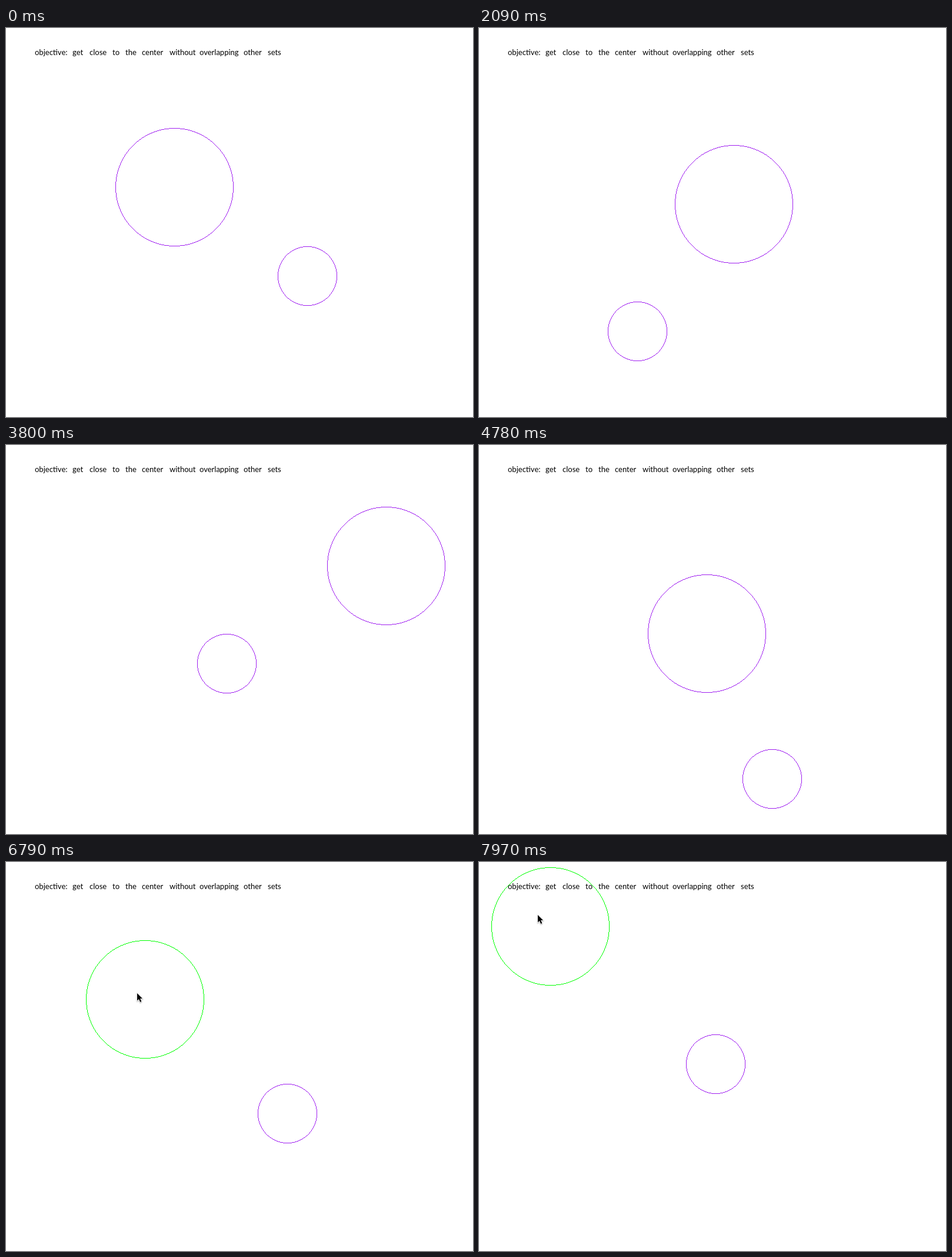
An HTML page with a canvas that plays this animation: 794 px wide and 661 px high, repeating every 8000 ms.

```html
<!DOCTYPE html>
<html lang="en">
<head>
<meta charset="utf-8">
<title>Sets</title>
<style>
html, body { margin: 0; width: 100%; height: 100%; overflow: hidden; background: #fff; }
canvas { display: block; }
</style>
</head>
<body>
<canvas id="stage" width="794" height="661"></canvas>
<script>
const LOOP = 8000, GRAB = 5940, DROP = 7970;
const ctx = document.getElementById("stage").getContext("2d");
const arrow = new Path2D("M0 0V12.6L3 9.9 5.1 15 7.3 14 5.1 9.1H9Z");
const words = { "objective:": 49, get: 113, close: 142, to: 181, the: 203, center: 231,
  without: 278, overlapping: 329, other: 404, sets: 445 };

// Each round puts both sets somewhere new, then they drift together to rest.
const rounds = [
  { start: 0, end: 1, big: [286, 270], small: [512, 421], drift: [0, 0] },
  { start: 500, end: 1280, big: [512, 150], small: [270, 271], drift: [-228, -420] },
  { start: 1600, end: 2400, big: [441, 199], small: [277, 415], drift: [21, -258] },
  { start: 2420, end: 3180, big: [757, 125], small: [486, 291], drift: [-183, 1] },
  { start: 3230, end: 3800, big: [646, 205], small: [375, 371], drift: [-111, 80] },
  { start: 4220, end: 4780, big: [387, 320], small: [498, 567], drift: [-50, -125] }
];
// Turning points of the drag: time, x, y
const dragged = [[GRAB, 392, 374], [6290, 296, 280], [6730, 247, 245],
  [7260, 148, 142], [7800, 104, 98], [DROP, 121, 109]];
const pushed = [[GRAB, 498, 567], [6040, 515, 578], [6290, 501, 513], [6730, 488, 438],
  [7260, 399, 346], [7800, 414, 361], [DROP, 402, 343]];

const progress = (t, a, b) => Math.min(1, Math.max(0, (t - a) / (b - a)));
const easeOut = p => p * (2 - p);
const mix = (a, b, p) => a.map((v, i) => v + (b[i] - v) * p);

function along(path, t) {
  const i = Math.max(1, path.findLastIndex(k => k[0] <= t) + 1);
  const b = path[Math.min(i, path.length - 1)], a = path[Math.min(i, path.length - 1) - 1];
  return mix(a.slice(1), b.slice(1), progress(t, a[0], b[0]));
}

function setsAt(t) {
  if (t >= GRAB) return [along(dragged, t), along(pushed, t)];
  const { start, end, big, small, drift } = rounds.findLast(r => r.start <= t);
  const left = 1 - progress(t, start, end);
  return [big, small].map(rest => rest.map((v, i) => v - drift[i] * left));
}

function pointerAt(t, big) {
  if (t >= GRAB) {
    const slip = progress(t, GRAB, DROP) ** 4;
    return [big[0] - 12 - 9 * slip, big[1] - 10 - 9 * slip];
  }
  const entry = mix([699, 641], [465, 451], easeOut(progress(t, 5050, 5150)));
  return mix(entry, [380, 364], progress(t, 5360, 5580));
}

// One-pixel outline without antialiasing, built from eight mirrored arcs
function ring([x, y], r, color) {
  const cx = Math.round(x), cy = Math.round(y);
  ctx.fillStyle = color;
  for (let u = 0; u <= r * Math.SQRT1_2; u++) {
    const v = Math.round(Math.sqrt(r * r - u * u));
    for (const [a, b] of [[u, v], [v, u]])
      for (const sx of [-1, 1])
        for (const sy of [-1, 1]) ctx.fillRect(cx + a * sx, cy + b * sy, 1, 1);
  }
}

function drawPointer([x, y]) {
  ctx.save();
  ctx.translate(Math.round(x), Math.round(y));
  ctx.shadowColor = "#0006";
  ctx.shadowBlur = 2;
  ctx.shadowOffsetY = 1;
  ctx.strokeStyle = "#fff";
  ctx.lineWidth = 1.4;
  ctx.stroke(arrow);
  ctx.shadowColor = "transparent";
  ctx.fillStyle = "#000";
  ctx.fill(arrow);
  ctx.restore();
}

function draw(now) {
  const t = now % LOOP;
  const [big, small] = setsAt(t);
  ctx.clearRect(0, 0, 794, 661);
  ctx.fillStyle = "#000";
  ctx.font = '13px Lato, "Open Sans", sans-serif';
  for (const [word, x] of Object.entries(words)) ctx.fillText(word, x, 46);
  ring(big, 100, t >= GRAB ? "#0f0" : "#a020f0");
  ring(small, 50, "#a020f0");
  if (t >= 5050) drawPointer(pointerAt(t, big));
  requestAnimationFrame(draw);
}
draw(performance.now());
</script>
</body>
</html>
```
